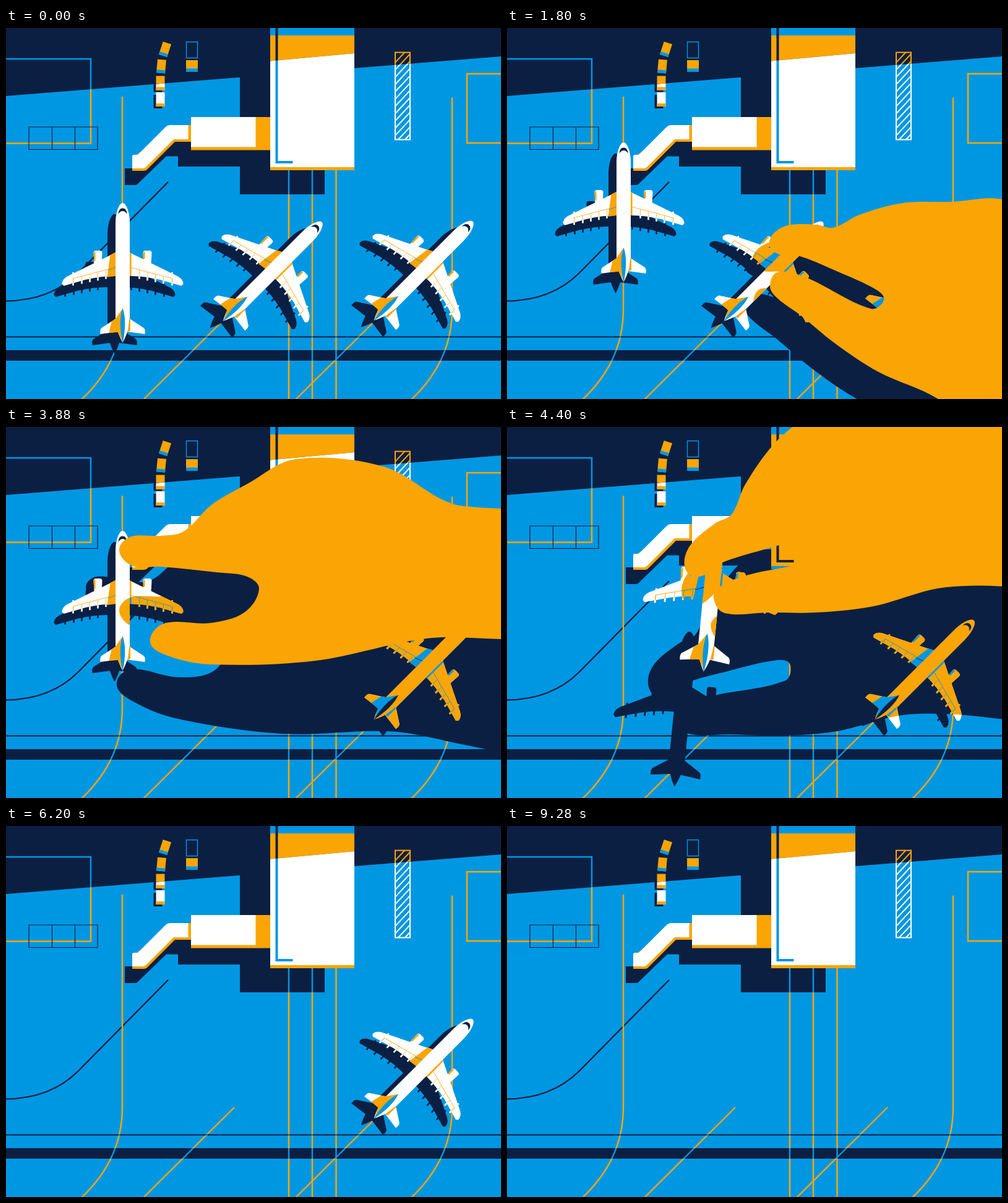
These frames come from a looping animation (800x600 px, 9.6 s). An HTML page with a canvas:

```html
<!DOCTYPE html>
<html lang="en">
<head>
<meta charset="utf-8">
<title>Airport apron</title>
<style>
html, body { margin: 0; width: 100%; height: 100%; overflow: hidden; background: #0097e2; }
canvas { display: block; width: 800px; height: 600px; }
</style>
</head>
<body>
<canvas id="stage" width="800" height="600"></canvas>
<script>
const ctx = document.getElementById('stage').getContext('2d');
const LOOP = 9600, STEP = 40;
const navy = '#0b1f43', blue = '#0097e2', orange = '#fba504', white = '#ffffff';
// Anything in shadow drops one tone: white > orange > blue > navy.
const LIT = { white, orange, blue, navy };
const SHADE = { white: orange, orange: blue, blue: navy, navy };

const lerp = (a, b, k) => a + (b - a) * k;
const progress = (t, start, end) => Math.min(1, Math.max(0, (t - start) / (end - start)));
const easeOut = k => 1 - (1 - k) ** 3;
const smooth = k => k * k * (3 - 2 * k);
const pose = (x, y, deg, scale = 1) => new DOMMatrix().translate(x, y).rotate(deg).scale(scale);

function fill(color, path) { ctx.fillStyle = color; ctx.fill(new Path2D(path)); }
function stroke(color, width, path) {
  ctx.strokeStyle = color;
  ctx.lineWidth = width;
  ctx.stroke(new Path2D(path));
}
function box(color, x, y, w, h) { ctx.fillStyle = color; ctx.fillRect(x, y, w, h); }
function within(path, draw) {
  ctx.save();
  ctx.clip(path);
  draw();
  ctx.restore();
}
function placed(matrix, draw) {
  ctx.save();
  ctx.transform(matrix.a, matrix.b, matrix.c, matrix.d, matrix.e, matrix.f);
  draw();
  ctx.restore();
}
function moved(path, matrix) {
  const result = new Path2D();
  result.addPath(path, matrix);
  return result;
}

/* ---------- apron and buildings ---------- */

const groundShadow = new Path2D(
  'M0 0H800V46L0 110Z M378 60H515V269H378Z M278 170H400V224H278Z ' +
  'M192 227H205L245 180H279V207.5H259L214 251Q212 254 208 254H192Z ' +
  'M0 498.5H800V500.5H0Z M0 521H800V538H0Z');
const roofShadow = new Path2D('M427 0H563V41L427 53.5Z');

function cart(p, x, y, deg, height) {
  placed(pose(x, y, deg), () => {
    box(p.navy, -11, -height / 2 + 4, 14, height - 1);
    box(p.white, -7, -height / 2, 14, height);
    box(p.orange, -7, height / 2 - 5, 14, 5);
  });
}

function ground(p) {
  box(p.blue, 0, 0, 800, 600);
  stroke(p.navy, 2.4, 'M0 441.5C50 441 88 425 117 396L262 249');
  for (const [x, top] of [[188, 111], [721, 112.5]]) {
    stroke(p.orange, 2.5, `M${x} ${top}V455C${x} 518 ${x - 28} 565 ${x - 66} 601`);
  }
  for (const x of [369, 615]) stroke(p.orange, 2.4, `M${x} 455L${x - 147} 601`);
  for (const x of [457, 495, 533.5]) stroke(p.orange, 2.5, `M${x} 220V600`);
  stroke(p.orange, 2.5, 'M0 50H137V186.5H0 M800 74H745V186H800');
  stroke(p.navy, 1.2, 'M37 160H148V196.5H37Z M74.5 160V196.5 M111.5 160V196.5');

  stroke(p.white, 2, 'M629 39.5H653V180.5H629Z');
  within(new Path2D('M629 39H653V181H629Z'), () => {
    for (let y = 44; y < 215; y += 11.8) stroke(p.white, 2, `M627 ${y + 14}L655 ${y - 16}`);
  });

  stroke(p.orange, 1.4, 'M291.5 22.5H309.5V48.5H291.5Z');
  box(p.white, 291, 52, 19, 14);
  box(p.orange, 291, 65.5, 19, 5.5);
  cart(p, 257, 34.5, 18, 22);
  cart(p, 251, 62, 5, 22);
  cart(p, 249.5, 89, 0, 23);
  cart(p, 249.5, 115.5, 0, 23);
}

function buildings(p) {
  fill(p.orange, 'M204 210L270 162V157H299V184H273L228 229Q226 231 223 231H204Z');
  fill(p.white, 'M204 208Q204 205 207 205H213L258 160Q261 157 265 157H294.5V180H271L226 225Q224 227 221 227H204Z');
  box(p.orange, 299, 144, 128, 53.5);
  box(p.white, 299, 144, 104.5, 48.5);
  box(p.orange, 427, 0, 136, 230);
  box(p.white, 427, 12, 136, 213);
  stroke(p.blue, 4, 'M437.5 0V217H463.5');
}

/* ---------- aircraft, nose at the origin, heading up ---------- */

const flaps = [27, 40, 53, 66, 80];

function silhouette(color) {
  for (const side of [1, -1]) {
    placed(new DOMMatrix([side, 0, 0, 1, 0, 0]), () => {
      fill(color, 'M33 81Q33 77 37 77H43Q47 77 47 81L46 98H34Z');
      fill(color, 'M11 80L90 119Q98 124 98 131L95 134L60 124Q35 118 11 118Z');
      fill(color, 'M8 185L34 202Q37 204 36 212L6 208Z');
      for (const x of flaps) box(color, x - 1.3, 112, 2.6, 5.5 + 0.2 * x);
    });
  }
  fill(color, 'M0 0C6 0 11.5 16 11.5 32V186C11 200 6 215 0 226C-6 215 -11.5 200 -11.5 186V32C-11.5 16 -6 0 0 0Z');
}

function aircraft(p) {
  silhouette(p.white);
  for (const side of [1, -1]) {
    placed(new DOMMatrix([side, 0, 0, 1, 0, 0]), () => {
      stroke(p.orange, 0.8, 'M12 104L80 122V130');
      for (const x of flaps) stroke(p.orange, 0.7, `M${x} ${101 + x * 0.265}V${114 + x * 0.18}`);
    });
  }
  fill(p.orange, 'M-11.5 79.5L-20 84L-25 120L-11.5 118Z');
  stroke(p.blue, 0.8, 'M-24 109L-11.5 104');
  box(p.orange, 11.5, 81, 2.6, 37);
  fill(p.orange, 'M-47 81L-44 78V93L-46 95Z M33 81L36 78V90L33 91Z');
  fill(p.orange, 'M-1 172L-11.5 187L-18 192L-22 210L-8 209L0 224Z M11 187L12.5 188V207L8 208Z');
  fill(p.blue, 'M0 170C5 184 5 204 0 227C-5 204 -5 184 0 170Z');
  fill(p.navy, 'M-7 18Q-6.5 8.5 0 8.5Q6.5 8.5 7 18Q4 13 0 13Q-4 13 -7 18Z');
}

/* ---------- hand, morphing from open to gripping ---------- */

function outline(coords, matrix) {
  const inverse = matrix.inverse();
  return coords.map(([x, y]) => inverse.transformPoint({ x, y }));
}

const openHand = outline([
  [183, 200], [200, 178], [250, 176], [287, 169], [332, 126], [390, 92], [468, 52], [610, 64],
  [740, 128], [1500, 150], [1500, 350], [800, 343], [680, 342], [500, 378], [330, 384],
  [262, 370], [233, 348], [255, 318], [330, 317], [385, 300], [409, 262], [390, 242],
  [340, 235], [250, 226], [205, 225]
], pose(188.5, 168, 0));

const grippingHand = outline([
  [424, 352], [431, 332], [455, 319], [500, 318], [527, 323], [570, 302], [640, 283], [720, 281],
  [800, 277], [1400, 420], [1200, 950], [700, 602], [600, 556], [530, 510], [475, 465],
  [437, 437], [425, 418], [437, 395], [482, 403], [588, 454], [609, 440], [598, 424],
  [530, 392], [470, 368], [440, 366]
], pose(510.5, 314, 45));

function handPath(grip) {
  const points = openHand.map((a, i) => ({
    x: lerp(a.x, grippingHand[i].x, grip),
    y: lerp(a.y, grippingHand[i].y, grip)
  }));
  const at = i => points[(i + points.length) % points.length];
  const tangent = i => {
    const dx = at(i + 1).x - at(i - 1).x, dy = at(i + 1).y - at(i - 1).y;
    const length = Math.hypot(dx, dy);
    return { x: dx / length, y: dy / length };
  };
  const path = new Path2D();
  path.moveTo(points[0].x, points[0].y);
  points.forEach((a, i) => {
    const b = at(i + 1), ta = tangent(i), tb = tangent(i + 1);
    const reach = Math.hypot(b.x - a.x, b.y - a.y) / 3;
    path.bezierCurveTo(a.x + ta.x * reach, a.y + ta.y * reach,
      b.x - tb.x * reach, b.y - tb.y * reach, b.x, b.y);
  });
  path.closePath();
  return path;
}

/* ---------- choreography ---------- */

const planes = [
  { x: 188.5, y: 168, angle: 0, shadow: [-13, 18], taxi: 115, reach: [3040, 3860], grip: [3890, 4060],
    lift: [4060, 5000], from: [680, 40], travel: [1176, -175], grow: 0.87, turn: 43 },
  { x: 510.5, y: 314, angle: 45, shadow: [-21, 11], taxi: 0, reach: [1000, 1680], grip: [1600, 1790],
    lift: [1840, 2840], from: [470, 380], travel: [950, -260], grow: 0.8, turn: 10 },
  { x: 754.5, y: 313, angle: 45, shadow: [-21, 11], taxi: 0, reach: [6120, 6460], grip: [6380, 6560],
    lift: [6560, 7460], from: [330, 260], travel: [504, -326], grow: 0.92, turn: 12.5 }
];

function stateOf(plane, t) {
  const lift = progress(t, ...plane.lift) ** 2;
  const rise = plane.grow * lift;
  const x = plane.x + plane.travel[0] * lift;
  const y = plane.y + plane.travel[1] * lift + plane.taxi * (1 - progress(t, 0, 2920)) ** 2;
  const matrix = pose(x, y, plane.angle + plane.turn * lift, 1 + rise);
  const [restX, restY] = plane.shadow;
  const fall = [-300 * rise, 1475 * rise];
  const state = {
    plane, matrix, held: t >= plane.lift[0],
    gone: t >= plane.lift[1],
    shadow: new DOMMatrix().translate(restX + fall[0], restY + fall[1]).multiply(matrix)
  };
  if (t >= plane.reach[0] && !state.gone) {
    const away = 1 - easeOut(progress(t, ...plane.reach));
    const grip = smooth(progress(t, ...plane.grip));
    const airborne = progress(rise, 0, 0.2);
    const shape = handPath(grip);
    const place = new DOMMatrix().translate(plane.from[0] * away, plane.from[1] * away).multiply(matrix);
    const castX = lerp(lerp(-54, -40, grip), restX, airborne);
    const castY = lerp(lerp(62, 38, grip), restY, airborne);
    const cast = new DOMMatrix()
      .translate(castX + fall[0] - 50 * away, castY + fall[1] + 220 * away)
      .translate(x, 0)
      .multiply(new DOMMatrix([1, lerp(0.18, 0.03, grip), 0, 1, 0, 0]))
      .translate(-x, 0);
    const near = place.translate(0, lerp(98, 38, grip) + 30 * lift);
    state.hand = moved(shape, place);
    state.handShadow = moved(state.hand, cast);
    state.nearShadow = moved(shape, near);
  }
  return state;
}

function render(t) {
  const states = planes.map(plane => stateOf(plane, t)).filter(s => !s.gone);
  const hands = states.filter(s => s.hand);

  ground(LIT);
  within(groundShadow, () => ground(SHADE));
  ctx.fillStyle = navy;
  for (const s of hands) ctx.fill(s.handShadow);
  for (const s of states) placed(s.shadow, () => silhouette(navy));

  buildings(LIT);
  within(roofShadow, () => buildings(SHADE));
  for (const s of hands) within(s.handShadow, () => buildings(SHADE));

  states.sort((a, b) => a.held - b.held);
  for (const s of states) {
    placed(s.matrix, () => aircraft(LIT));
    for (const h of hands) {
      if (s.held && h !== s) continue;
      within(h === s ? h.nearShadow : h.handShadow, () => placed(s.matrix, () => aircraft(SHADE)));
    }
  }

  ctx.fillStyle = orange;
  for (const s of hands) ctx.fill(s.hand);
}

const start = performance.now();
function frame() {
  const t = (performance.now() - start) % LOOP;
  render(Math.floor(t / STEP) * STEP);
  requestAnimationFrame(frame);
}
frame();
</script>
</body>
</html>
```
